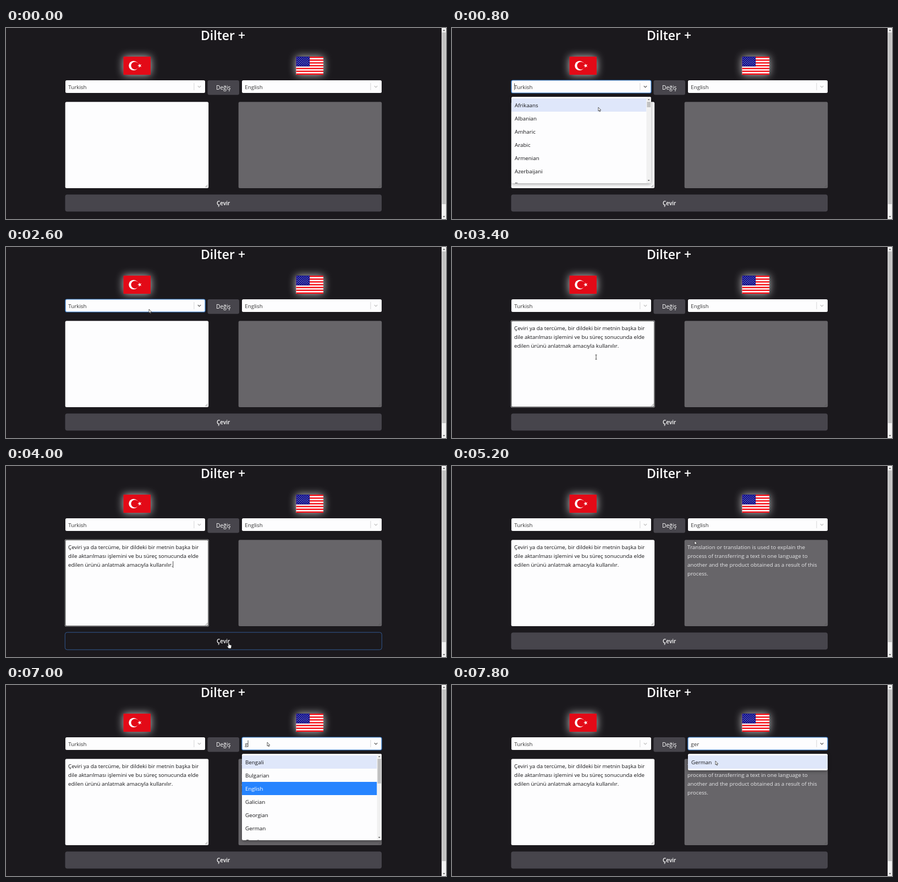
An HTML page with a canvas that plays this animation: 800x347 px, repeating every 8 s.

```html
<!DOCTYPE html>
<html lang="tr">
<head>
<meta charset="utf-8">
<title>Dilter +</title>
<style>
html, body { margin: 0; width: 100%; height: 100%; overflow: hidden; background: #1b191d; }
canvas { display: block; width: 800px; height: 347px; }
</style>
</head>
<body>
<canvas id="stage"></canvas>
<script>
const W = 800, H = 347, LOOP = 8000, STEP = 200;
const FONT = '"Open Sans", "Noto Sans", sans-serif';
const PAGE = '#1b191d', BUTTON = '#47454c', BLUE = '#2684ff', PALE = '#dfe7fa', INK = '#151517';
const BODY = 9.8;
const LEFT = 108, RIGHT = 429, SELECT_W = 254;
const ROW = 24, PAD = 3, MENU_TOP = 125, MENU_MAX = 157;

const languages = ('Afrikaans,Albanian,Amharic,Arabic,Armenian,Azerbaijani,Basque,Belarusian,Bengali,Bosnian,' +
  'Bulgarian,Catalan,Cebuano,Chichewa,Chinese,Corsican,Croatian,Czech,Danish,Dutch,English,Esperanto,Estonian,' +
  'Filipino,Finnish,French,Frisian,Galician,Georgian,German,Greek,Gujarati,Haitian Creole,Hausa,Hawaiian,Hebrew,' +
  'Hindi,Hmong,Hungarian,Icelandic,Igbo,Indonesian,Irish,Italian,Japanese,Javanese,Kannada,Kazakh,Khmer,Korean,' +
  'Kurdish,Kyrgyz,Lao,Latin,Latvian,Lithuanian,Luxembourgish,Macedonian,Malagasy,Malay,Malayalam,Maltese,Maori,' +
  'Marathi,Mongolian,Nepali,Norwegian,Odia,Pashto,Persian,Polish,Portuguese,Punjabi,Romanian,Russian,Samoan,' +
  'Scots Gaelic,Serbian,Sesotho,Shona,Sindhi,Sinhala,Slovak,Slovenian,Somali,Spanish,Sundanese,Swahili,Swedish,' +
  'Tajik,Tamil,Telugu,Thai,Turkish,Ukrainian,Urdu,Uyghur,Uzbek,Vietnamese,Welsh,Xhosa,Yiddish,Yoruba,Zulu').split(',');

const inputLines = [
  'Çeviri ya da tercüme, bir dildeki bir metnin başka bir',
  'dile aktarılması işlemini ve bu süreç sonucunda elde',
  'edilen ürünü anlatmak amacıyla kullanılır.'
];
const outputLines = [
  'Translation or translation is used to explain the',
  'process of transferring a text in one language to',
  'another and the product obtained as a result of this',
  'process.'
];

// Pointer path: time, x, y
const path = [
  [400, 262, 108], [600, 266, 128], [800, 266, 144], [2000, 266, 144], [2400, 260, 113], [2600, 260, 113],
  [3000, 250, 190], [3400, 262, 200], [3800, 404, 321], [4400, 404, 321],
  [5000, 441, 136], [5200, 441, 136], [5600, 475, 104], [7200, 475, 104], [7600, 479, 138], [8000, 479, 138]
];

const canvas = document.getElementById('stage');
const ctx = canvas.getContext('2d');
const dpr = window.devicePixelRatio || 1;
canvas.width = W * dpr;
canvas.height = H * dpr;
ctx.scale(dpr, dpr);

function rect(x, y, w, h, color) {
  ctx.fillStyle = color;
  ctx.fillRect(x, y, w, h);
}

function round(x, y, w, h, r, fill, stroke, line = 1) {
  ctx.beginPath();
  ctx.roundRect(x, y, w, h, r);
  if (fill) { ctx.fillStyle = fill; ctx.fill(); }
  if (stroke) { ctx.strokeStyle = stroke; ctx.lineWidth = line; ctx.stroke(); }
}

function disc(x, y, r, color) {
  ctx.beginPath();
  ctx.arc(x, y, r, 0, Math.PI * 2);
  ctx.fillStyle = color;
  ctx.fill();
}

function poly(points, fill, stroke, line = 1) {
  ctx.beginPath();
  points.forEach(([x, y]) => ctx.lineTo(x, y));
  if (fill) { ctx.closePath(); ctx.fillStyle = fill; ctx.fill(); }
  if (stroke) { ctx.strokeStyle = stroke; ctx.lineWidth = line; ctx.stroke(); }
}

function text(str, x, y, color, size = BODY, weight = 400, align = 'left') {
  ctx.font = `${weight} ${size}px ${FONT}`;
  ctx.textAlign = align;
  ctx.fillStyle = color;
  ctx.fillText(str, x, y);
  return ctx.measureText(str).width;
}

function glow(x, y, w, h, color) {
  ctx.save();
  ctx.shadowColor = 'rgba(255,255,255,0.75)';
  ctx.shadowBlur = 15 * dpr;
  rect(x, y, w, h, color);
  ctx.restore();
}

function turkishFlag() {
  const red = '#e30a17', y = 68.4;
  glow(213.5, 52, 49.5, 33, red);
  disc(232, y, 8.7, '#fff');
  disc(234.4, y, 7, red);
  const star = Array.from({ length: 10 }, (_, i) => {
    const a = Math.PI + i * Math.PI / 5, r = i % 2 ? 1.6 : 4;
    return [243 + r * Math.cos(a), y + r * Math.sin(a)];
  });
  poly(star, '#fff');
}

function americanFlag() {
  const x = 527.5, y = 52, w = 49.5, h = 33, band = h / 13;
  glow(x, y, w, h, '#fff');
  for (let i = 0; i < 13; i += 2) rect(x, y + i * band, w, band, '#f5131b');
  rect(x, y, 24.5, band * 7, '#10108c');
  for (let row = 0; row < 9; row++) {
    for (let col = row % 2; col < 11; col += 2) disc(x + 2.2 + col * 2, y + 1.8 + row * 1.77, 0.55, '#d5d5f0');
  }
}

function arrowHead(x, y, dir, color) {
  poly([[x - 2, y + dir], [x + 2, y + dir], [x, y - dir]], color);
}

function pageScrollbar() {
  rect(792, 0, 8, H, '#f1f1f1');
  rect(792.7, 8, 6.8, 312, '#c1c1c1');
  arrowHead(796.3, 4, 1.2, '#505050');
  arrowHead(796.3, 343, -1.2, '#505050');
}

function caret(x, y, t) {
  if (t % 1060 >= 530) rect(x, y, 0.8, 12, '#222');
}

function select(x, value, s, t) {
  round(x, 95, SELECT_W, 23, 2.5, '#fdfdfe');
  if (s.focus) round(x, 95, SELECT_W, 23, 2.5, null, '#3c85d8', 1.2);
  rect(x + 233.5, 100, 0.8, 13, '#ccc');
  const cx = x + 243.5;
  poly([[cx - 2.7, 105.2], [cx, 107.9], [cx + 2.7, 105.2]], null, s.focus ? '#666' : '#c4c4c4', 1.3);
  const w = text(s.query || value, x + 5.3, 110.7, '#333');
  if (s.open) caret(x + 5.3 + (s.query ? w : 0), 100.5, t);
}

function menu(x, s, pointer) {
  const items = languages.filter(l => l.toLowerCase().includes(s.query));
  const content = items.length * ROW + PAD * 2;
  const h = Math.min(MENU_MAX, content), scrolls = content > MENU_MAX;
  const w = SELECT_W, inner = scrolls ? w - 8.5 : w;
  const overMenu = pointer && pointer.y > MENU_TOP + PAD && pointer.y < MENU_TOP + h;
  const active = overMenu
    ? Math.floor((pointer.y - MENU_TOP - PAD + s.scroll) / ROW)
    : s.query ? 0 : items.indexOf(s.selected);

  ctx.save();
  ctx.shadowColor = 'rgba(0,0,0,0.35)';
  ctx.shadowBlur = 6 * dpr;
  ctx.shadowOffsetY = 2 * dpr;
  round(x, MENU_TOP, w, h, 2.5, '#fdfdfe');
  ctx.restore();

  ctx.save();
  ctx.beginPath();
  ctx.roundRect(x, MENU_TOP, w, h, 2.5);
  ctx.clip();
  items.forEach((name, i) => {
    const y = MENU_TOP + PAD + i * ROW - s.scroll;
    if (y < MENU_TOP - ROW || y > MENU_TOP + h) return;
    const chosen = name === s.selected;
    if (chosen || i === active) rect(x, y, inner, ROW, chosen ? BLUE : PALE);
    text(name, x + 6, y + 15.7, chosen ? '#fff' : INK);
  });
  if (scrolls) {
    const track = h - 18;
    const thumb = Math.max(10, track * h / content);
    const top = MENU_TOP + 9 + (track - thumb) * s.scroll / (content - h);
    rect(x + inner, MENU_TOP, 8.5, h, '#f1f1f1');
    rect(x + inner + 1, top, 6.5, thumb, '#c1c1c1');
    arrowHead(x + inner + 4.2, MENU_TOP + 5, 1.1, '#505050');
    arrowHead(x + inner + 4.2, MENU_TOP + h - 5, -1.1, '#505050');
  }
  ctx.restore();
}

function area(x, color, lines, ink, focus) {
  if (focus) {
    round(x - 1.3, 133.2, 262.2, 158.6, 3, '#c9c9cb');
    round(x - 0.3, 134.2, 260.2, 156.6, 2.5, color, '#101010', 1);
  } else {
    round(x - 0.3, 134.2, 260.5, 156.8, 2.5, color);
  }
  const rx = x + 258.7, ry = 289.5;
  for (const d of [2, 4.5]) poly([[rx - d, ry], [rx, ry - d]], null, '#555', 0.7);
  lines.forEach((line, i) => text(line, x + 5, 151.3 + i * 15.8, ink));
}

function pointerAt(t) {
  if (t < path[0][0]) return null;
  const i = path.findIndex(p => p[0] > t);
  const [t0, x0, y0] = path[i - 1], [t1, x1, y1] = path[i];
  const k = (t - t0) / (t1 - t0);
  return { x: x0 + (x1 - x0) * k, y: y0 + (y1 - y0) * k };
}

function drawPointer({ x, y }, kind) {
  ctx.save();
  ctx.translate(x, y);
  ctx.lineJoin = 'round';
  if (kind === 'hand') {
    const hand = [[0, 0.5], [1, 0], [2, 0.7], [2, 3.6], [5.4, 4.4], [6, 5.4], [5.5, 9], [4.8, 10.5], [1, 10.5], [-2, 6.7], [-1.2, 5.8], [0, 6.8], [0, 0.5]];
    poly(hand, '#fff', '#222', 0.7);
  } else if (kind === 'beam') {
    poly([[-1.5, -4], [1.5, -4]], null, '#222', 0.8);
    poly([[0, -4], [0, 4]], null, '#222', 0.8);
    poly([[-1.5, 4], [1.5, 4]], null, '#222', 0.8);
  } else {
    const arrow = [[0, 0], [0, 7], [1.6, 5.6], [2.6, 8], [3.6, 7.6], [2.6, 5.2], [4.8, 5.2], [0, 0]];
    poly(arrow, '#fff', '#222', 0.7);
  }
  ctx.restore();
}

function draw(t) {
  const pointer = pointerAt(t);
  const between = (a, b) => t >= a && t < b;
  const pasted = t >= 3400, typing = between(3000, 4200), hover = between(3800, 4600);

  const left = {
    focus: between(400, 3000), open: between(400, 2600), query: '', selected: null,
    scroll: Math.max(0, Math.min(4, (t - 1200) / STEP)) * 66
  };
  const query = t < 6800 ? '' : t < 7200 ? 'g' : t < 7400 ? 'ge' : 'ger';
  const right = {
    focus: t >= 5800, open: t >= 5800, query, selected: 'English',
    scroll: query ? 0 : 21 * ROW + PAD + 8 - MENU_MAX
  };

  rect(0, 0, W, H, PAGE);
  text('Dilter +', 394.5, 21.5, '#fff', 23, 600, 'center');
  turkishFlag();
  americanFlag();
  pageScrollbar();

  round(366.5, 95, 57.5, 26.5, 3, BUTTON);
  text('Değiş', 395.2, 112, '#fff', 10.3, 400, 'center');
  select(LEFT, 'Turkish', left, t);
  select(RIGHT, 'English', right, t);

  area(LEFT, '#fdfdfe', pasted ? inputLines : [], INK, typing);
  area(423, '#676569', t >= 4600 ? outputLines : [], '#e6e6e8', false);
  if (typing) {
    ctx.font = `400 ${BODY}px ${FONT}`;
    const last = pasted ? inputLines[2] : '';
    caret(LEFT + 5 + ctx.measureText(last).width, pasted ? 173 : 141.5, t);
  }

  if (hover) round(107.3, 302.2, 576, 31.6, 4, PAGE, '#31588f', 1);
  else round(107.5, 302.5, 575.5, 31, 4, BUTTON);
  text('Çevir', 395.2, 322, '#fff', 10, 600, 'center');

  if (left.open) menu(LEFT, left, pointer);
  if (right.open) menu(RIGHT, right, pointer);
  if (pointer) drawPointer(pointer, hover && pointer.y > 302 ? 'hand' : between(2800, 3600) ? 'beam' : 'arrow');
}

const start = performance.now();
function tick() {
  const t = (performance.now() - start) % LOOP;
  draw(Math.floor(t / STEP) * STEP);
  requestAnimationFrame(tick);
}
tick();
</script>
</body>
</html>
```
